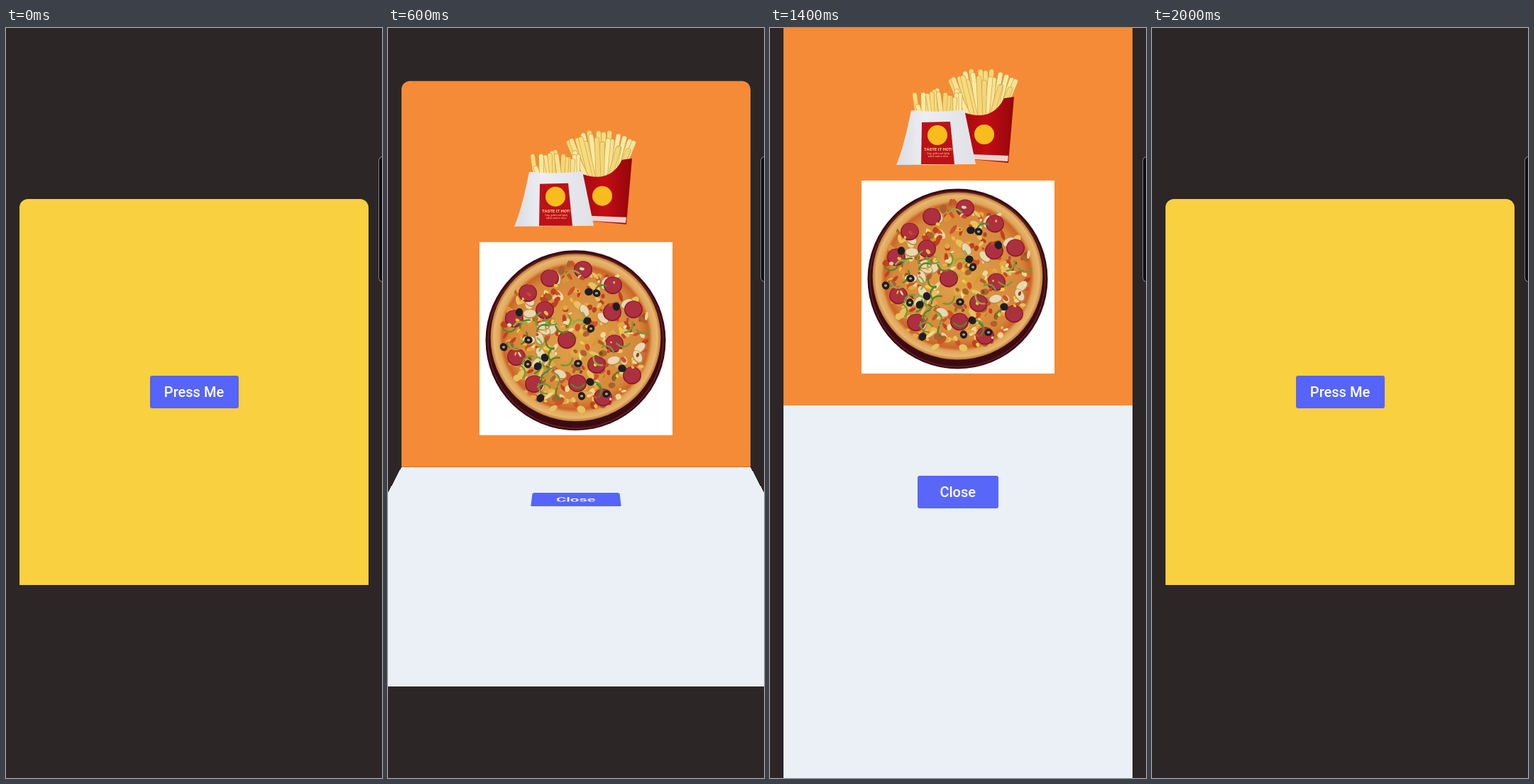
Recreate the animation shown at these times as an HTML page. Size 530 px wide and 1057 px high, loop 4400 ms.

```html
<!DOCTYPE html>
<html lang="en">
<head>
<meta charset="utf-8">
<title>Folding card</title>
<style>
  html, body { margin: 0; width: 100%; height: 100%; overflow: hidden; background: #2c2627; }
  #stage { position: relative; width: 530px; height: 1057px; overflow: hidden; background: #2c2627; }
  #card { position: absolute; left: 19px; top: 241px; width: 492px; height: 544px; }
  #inside, .flap { position: absolute; left: 0; width: 492px; height: 544px; }
  #inside { top: 0; display: block; border-radius: 12px 12px 0 0; background: #f58b36; }
  #front { top: 0; border-radius: 12px 12px 0 0; background: #f9d03f; transform-origin: 50% 100%; }
  #back { top: 544px; border-radius: 0 0 12px 12px; background: #ebf0f7; transform-origin: 50% 0; }
  .button {
    position: absolute; height: 46px; border-radius: 3px; overflow: hidden; background: #5664f9;
    color: #fff; font: 500 20px/46px Roboto, sans-serif; text-align: center; white-space: nowrap;
  }
  .button i { position: absolute; inset: 0; background: #fff; opacity: 0; }
  .button span { position: relative; }
  #press { left: 183.5px; top: 249px; width: 125px; }
  #close { left: 189px; top: 99px; width: 113.5px; }
  #handle {
    position: absolute; left: 525px; top: 181px; width: 20px; height: 175px;
    border: 1px solid rgba(255, 255, 255, .4); border-radius: 6px;
    background: rgba(0, 0, 0, .65); background-clip: padding-box;
  }
</style>
</head>
<body>
<div id="stage">
  <div id="card">
    <svg id="inside" viewBox="19 75 492 544">
      <defs>
        <linearGradient id="paper">
          <stop offset="0" stop-color="#d9dce2"/><stop offset=".35" stop-color="#eceef2"/>
          <stop offset="1" stop-color="#dfe1e7"/>
        </linearGradient>
        <linearGradient id="carton">
          <stop offset="0" stop-color="#a5080f"/><stop offset=".5" stop-color="#c30d14"/>
          <stop offset="1" stop-color="#93060c"/>
        </linearGradient>
        <radialGradient id="dough">
          <stop offset="0" stop-color="#dfa548"/><stop offset=".76" stop-color="#d5863a"/>
          <stop offset=".86" stop-color="#cb6428"/><stop offset=".9" stop-color="#e0a55a"/>
          <stop offset=".96" stop-color="#e8b76e"/><stop offset="1" stop-color="#bd7634"/>
        </radialGradient>
      </defs>
      <g id="tallFries"></g>
      <path fill="url(#carton)" d="M268 204Q312 222 330 186L344 184L336 277L284 272Z"/>
      <path fill="#edd2cf" d="M286 265L336 267L335 275L287 272Z"/>
      <circle cx="302" cy="237" r="14" fill="#f8bd1c"/>
      <g id="shortFries"></g>
      <path fill="url(#paper)" d="M199 203Q236 207 274 202L290 279L178 280Q189 254 199 203Z"/>
      <path fill="#bd1118" d="M214 220L254 219L260 279L213 279Z"/>
      <circle cx="236" cy="238" r="14" fill="#f8bd1c"/>
      <g fill="#f8dc9a" font-family="Roboto, sans-serif" text-anchor="middle">
        <text x="237" y="260" font-size="6" font-weight="700">TASTE IT HOT!</text>
        <text x="237" y="265" font-size="3">Crisp, golden and lightly</text>
        <text x="237" y="269" font-size="3">salted, made to share</text>
      </g>
      <path fill="#fff" d="M129 302H401V574H129Z"/>
      <circle cx="264.5" cy="440.5" r="127" fill="#3b0b11"/>
      <circle cx="264.5" cy="441" r="123.5" fill="none" stroke="#682027" stroke-width="1.5"/>
      <ellipse cx="264.5" cy="436.5" rx="120" ry="118" fill="url(#dough)"/>
      <g id="toppings"></g>
    </svg>
    <div id="back" class="flap"><div id="close" class="button"><i></i><span>Close</span></div></div>
    <div id="front" class="flap"><div id="press" class="button"><i></i><span>Press Me</span></div></div>
  </div>
  <div id="handle"></div>
</div>
<script>
const $ = id => document.getElementById(id);
const clamp = v => Math.min(1, Math.max(0, v));

let seed = 11;
const random = () => (seed = seed * 16807 % 2147483647) / 2147483647;
const between = (a, b) => a + (b - a) * random();
const pick = list => list[Math.floor(random() * list.length)];

function add(parent, tag, attrs) {
  const node = document.createElementNS("http://www.w3.org/2000/svg", tag);
  for (const key in attrs) node.setAttribute(key, attrs[key]);
  $(parent).appendChild(node);
}

// A fan of fries from a base row to an arched row of tips.
function fries(parent, count, base, tips, baseY, tipY, sag, width) {
  for (let n = 0; n < count; n++) {
    const i = n * 7 % count, u = i / (count - 1);
    const lerp = range => range[0] + (range[1] - range[0]) * u;
    const y = tipY + sag * (2 * u - 1) ** 2 + between(0, 24) * (n / count);
    const d = `M${lerp(base)} ${baseY}L${lerp(tips) + between(-4, 4) * (n / count)} ${y}`;
    add(parent, "path", { d, stroke: "#d0a048", "stroke-width": width + 0.6, "stroke-linecap": "round" });
    add(parent, "path", { d, stroke: pick(["#f6dc7e", "#f3d678", "#fae9a2", "#f8e292"]),
      "stroke-width": width - 0.8, "stroke-linecap": "round" });
  }
}

function scatter(count, radius, draw) {
  for (let i = 0; i < count; i++) {
    const a = random() * Math.PI * 2, r = radius * Math.sqrt(random());
    draw(264.5 + r * Math.cos(a), 436.5 + r * Math.sin(a), random() * 360);
  }
}

const blob = (x, y, rx, ry, angle, fill) => add("toppings", "ellipse",
  { cx: x, cy: y, rx, ry, fill, transform: `rotate(${angle} ${x} ${y})` });

const sausage = [[228, 353], [197, 374], [275, 341], [317, 363], [346, 397], [178, 410], [221, 398],
  [181, 464], [252, 440], [316, 401], [319, 445], [344, 490], [294, 475], [267, 501], [303, 521], [206, 502]];
const olives = [[283, 372], [294, 374], [322, 393], [286, 424], [281, 413], [198, 440], [221, 465], [197, 474],
  [211, 477], [268, 473], [285, 499], [273, 519], [215, 522], [308, 516], [330, 480], [163, 450], [185, 401]];

function pizza() {
  scatter(260, 105, (x, y, a) => blob(x, y, between(3, 8), between(2, 5), a,
    pick(["#cf5228", "#e6c260", "#ecd79a", "#dd9436", "#bf401f", "#e3a846", "#a9632c"])));
  scatter(22, 96, (x, y, a) => {
    blob(x, y, 10, 6.5, a, "#b58a56");
    blob(x, y - 0.6, 8.8, 5.4, a, "#ead7ae");
  });
  for (const [x, y] of sausage) {
    blob(x, y, 13, 12.5, 0, "#8c1c2b");
    blob(x, y - 0.5, 11.5, 11, 0, "#ad3040");
  }
  scatter(90, 102, (x, y, a) => blob(x, y, between(1.5, 4), between(1, 2.5), a,
    pick(["#f0cf3c", "#e9bc38", "#f2e0b0", "#c9482a", "#7a4a24"])));
  scatter(40, 98, (x, y, a) => add("toppings", "path", { d: `M${x - 9} ${y}q9 -9 18 1`, fill: "none",
    stroke: pick(["#6f9a35", "#8bab45", "#55852c"]), "stroke-width": 2.4, "stroke-linecap": "round",
    transform: `rotate(${a} ${x} ${y})` }));
  olives.forEach(([x, y], i) => {
    blob(x, y, 5.8, 5.2, i * 40, "#201d22");
    if (i % 2) blob(x, y, 2.2, 1.8, 0, "#b9a078");
  });
}

fries("tallFries", 23, [278, 324], [255, 345], 216, 146, 16, 7);
fries("shortFries", 15, [208, 267], [204, 268], 210, 175, 6, 6.5);
pizza();

const LOOP = 4400, STEP = 100, FOLD = 299;
const OPEN_AT = 417.2, CLOSE_AT = 1400.5;
const glow = (id, v) => { $(id).firstChild.style.opacity = v; };
const tilt = angle => angle ? `perspective(1290px) rotateX(${angle}deg)` : "none";

function render(time) {
  const t = Math.floor(time % LOOP / STEP) * STEP;
  const open = clamp((t - OPEN_AT) / FOLD) - clamp((t - CLOSE_AT) / FOLD);
  const angle = 180 * open;
  $("card").style.transform = `translateY(${-Math.min(272 * open, 253)}px)`;
  $("inside").style.visibility = open > 0 ? "visible" : "hidden";
  $("front").style.display = open < 0.5 ? "block" : "none";
  $("back").style.display = open < 0.5 ? "none" : "block";
  $("front").style.transform = tilt(-angle);
  $("back").style.transform = tilt(180 - angle);
  glow("press", t < 600 ? 0.32 * clamp((t - 300) / 200) : 0);
  glow("close", 0.32 * clamp((t - 1380) / 300));
}

const start = performance.now();
function tick() {
  render(performance.now() - start);
  requestAnimationFrame(tick);
}
tick();
</script>
</body>
</html>
```
